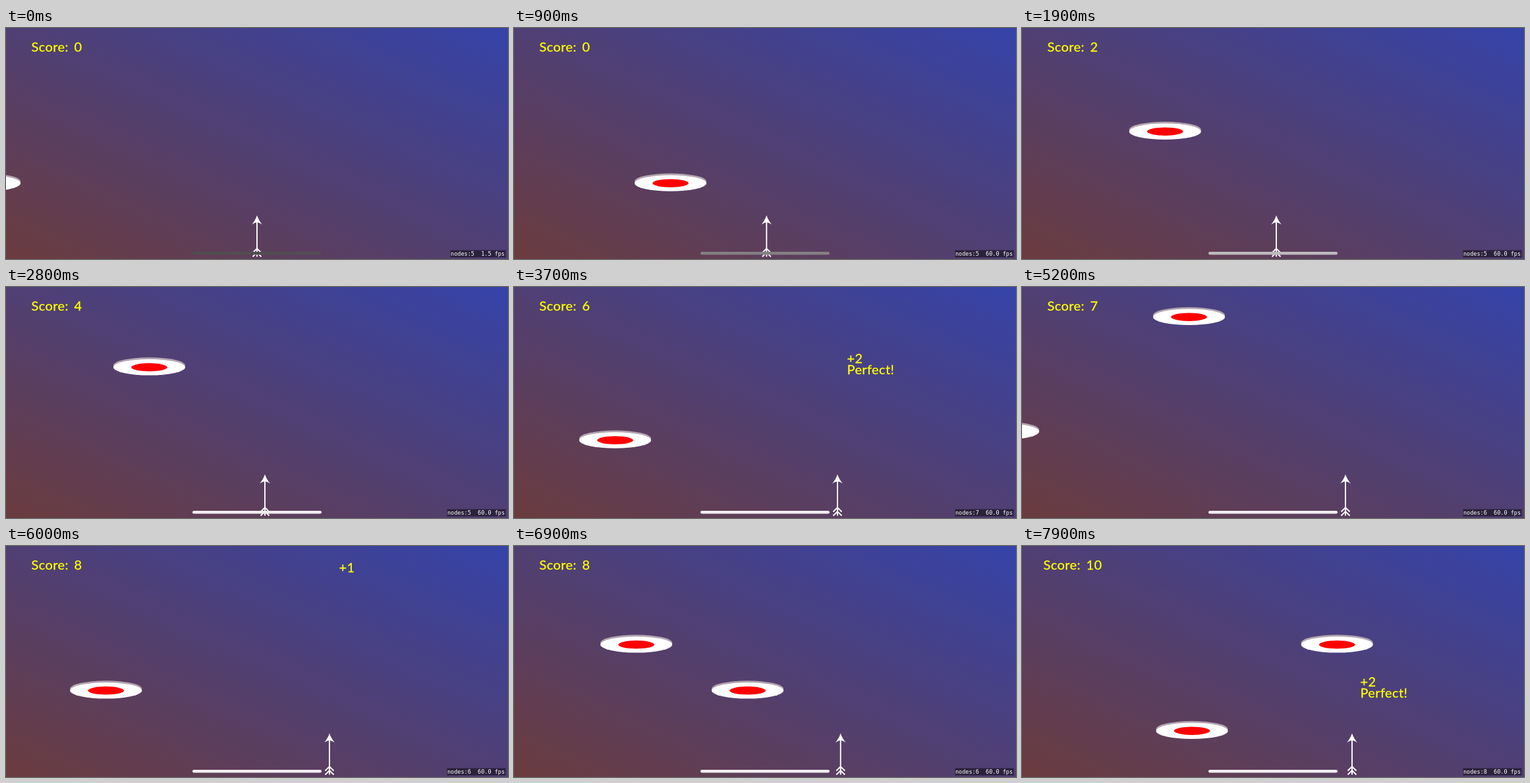
An HTML page for the animation above (8000 ms loop, 762 px wide and 352 px high).

```html
<!DOCTYPE html>
<html lang="en">
<head>
<meta charset="utf-8">
<title>Arrow game</title>
<style>
  html, body { margin: 0; width: 100%; height: 100%; overflow: hidden; }
  body { background: linear-gradient(to top right, #6b3c3e, #3543a9); }
  svg { display: block; width: 762px; height: 352px; }
  .label { font: 20px Lato, sans-serif; fill: #ff0; stroke: #ff0; stroke-width: .3; letter-spacing: .4px; word-spacing: 3px; }
  .stats { font: 8.5px "DejaVu Sans Mono", monospace; fill: #fff; white-space: pre; }
</style>
</head>
<body>
<svg id="stage" viewBox="0 0 762 352"></svg>
<script>
const LOOP = 8000, STEP = 100, POPUP = 420;
const TIP = 286, ARROW_SPEED = 0.8, START_X = -60, BULLSEYE = 27.3;
const stage = document.getElementById('stage');

// The archer drags the arrow between these points: [time, x]
const aim = [[0, 381], [1900, 386], [2800, 393], [3250, 491], [6000, 491], [LOOP, 501.5]];

function aimAt(t) {
  const i = aim.findIndex(([end]) => end > t);
  const [t0, x0] = aim[i - 1], [t1, x1] = aim[i];
  return x0 + (x1 - x0) * (t - t0) / (t1 - t0);
}

const plateX = (p, t) => START_X + (t - p.spawn) * p.speed;

// A plate is hit once its centre is `off` px short of the arrow; without `off` it flies on.
function hitTime(p) {
  for (let t = Math.max(0, p.spawn); t < LOOP; t += 10) {
    if (plateX(p, t) >= aimAt(t) - p.off) return t;
  }
  return Infinity;
}

// One plate a second: speed in px/ms, height, off
const plates = [
  [0.3, 236.5, 15], [0.33, 157.7, 20], [0.375, 122.3, 15], [0.3336, 233.5, 37],
  [0.275, 45.7, 37], [0.2253, 220.3, 5], [0.2925, 150.3], [0.3786, 281.7],
].map(([speed, y, off], i) => {
  const p = { speed, y, off, spawn: i ? i * 1000 + 60 : -92 };
  p.hit = hitTime(p);
  p.launch = p.hit - (TIP - y) / ARROW_SPEED;
  p.points = off < BULLSEYE ? 2 : 1;
  return p;
});

const total = list => list.reduce((sum, p) => sum + p.points, 0);
const ellipse = (y, rx, ry, fill) => `<ellipse cy="${y}" rx="${rx}" ry="${ry}" fill="${fill}"/>`;
const label = (x, y, text, anchor = 'start') =>
  `<text class="label" x="${x}" y="${y}" text-anchor="${anchor}">${text}</text>`;

function plate(x, y) {
  return `<g transform="translate(${x} ${y})">` +
    ellipse(-2.8, 54.5, 12.2, '#b3a5b0') +
    ellipse(0, 54.5, 12.3, '#fff') +
    ellipse(0, BULLSEYE, 6.2, '#f00') + '</g>';
}

function arrow(x, rise) {
  return `<g transform="translate(${x} ${TIP - rise})">
    <path d="M0-.5Q3 8 8 13.5Q4 10.5 0 10Q-4 10.5-8 13.5Q-3 8 0-.5" fill="#fff"/>
    <path d="M0 8V62.5M-6.5 56.5L0 50L6.5 56.5M-6.5 62.5L0 56L6.5 62.5"
      fill="none" stroke="#fff" stroke-width="1.9"/></g>`;
}

function popup({ hit, y, points }) {
  const x = aimAt(hit) + 14.5;
  return label(x, y - 6, '+' + points) + (points > 1 ? label(x, y + 11, 'Perfect!') : '');
}

function stats(nodes, t) {
  const text = `nodes:${nodes}  ${t ? '60.0' : '1.5'} fps`;
  const width = text.length * 5.12 + 2;
  return `<rect x="${758.5 - width}" y="338.5" width="${width}" height="11" fill="#000" fill-opacity=".47"/>
    <text class="stats" x="757" y="347" text-anchor="end">${text}</text>`;
}

function draw(t) {
  const alive = plates.filter(p => t >= p.spawn && t < p.hit);
  const down = plates.filter(p => t >= p.hit);
  const recent = down.filter(p => t < p.hit + POPUP);
  const shot = alive.find(p => t >= p.launch);
  const grey = 80 + 160 * Math.min(1, t / 2800);

  stage.innerHTML =
    label(77, 35.5, 'Score: ' + total(down), 'middle') +
    alive.map(p => plate(plateX(p, t), p.y)).join('') +
    (shot ? arrow(aimAt(shot.launch), (t - shot.launch) * ARROW_SPEED) : arrow(aimAt(t), 0)) +
    recent.map(popup).join('') +
    `<rect x="283" y="341" width="196" height="4.5" rx="2.2" fill="rgb(${grey},${grey - 3},${grey})"/>` +
    stats(4 + alive.length + total(recent), t);
}

let shown = -1;
function tick() {
  const t = Math.floor(performance.now() % LOOP / STEP) * STEP;
  if (t !== shown) draw(shown = t);
  requestAnimationFrame(tick);
}
tick();
</script>
</body>
</html>
```
